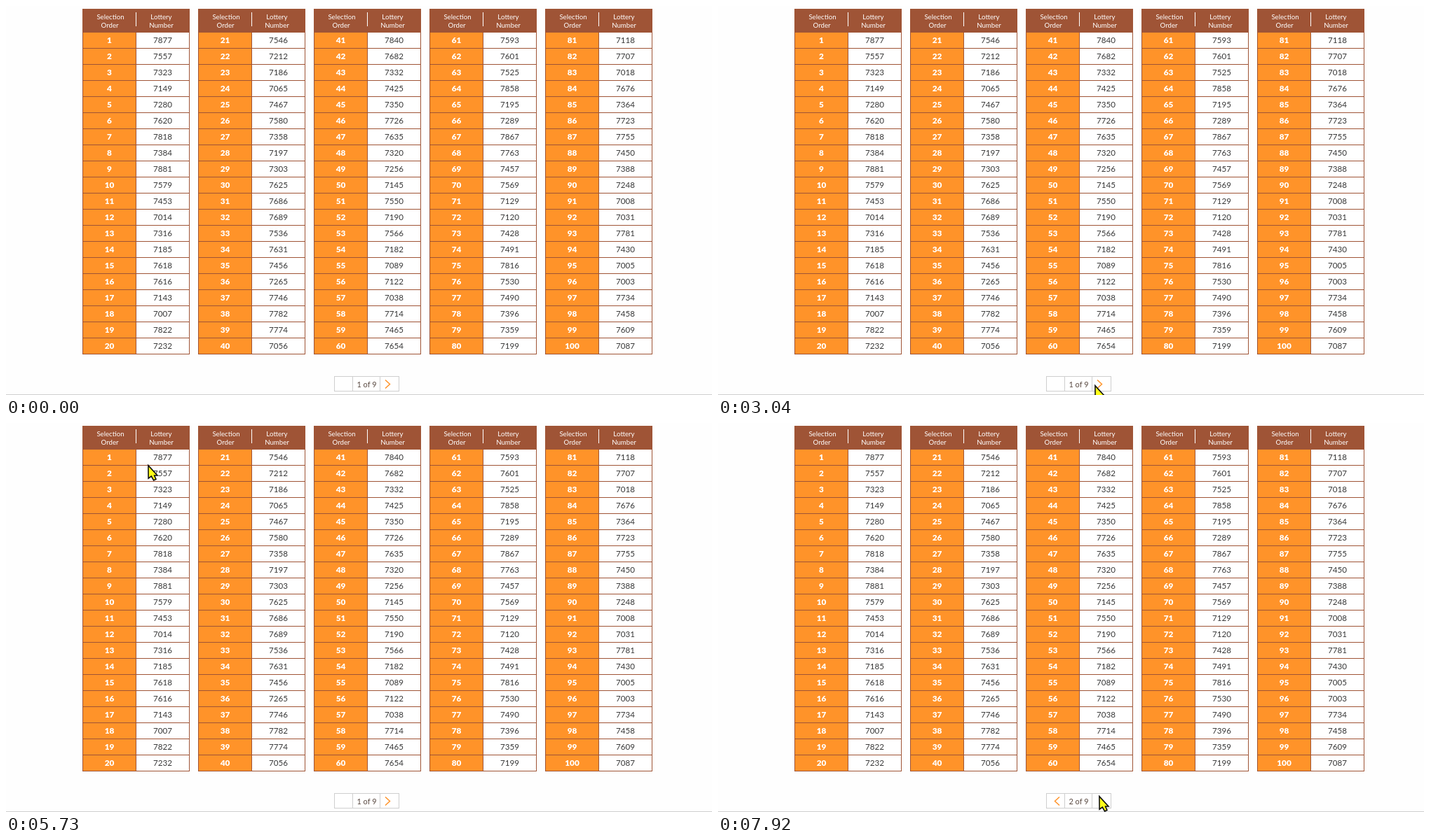
Animation of 1007x556 px, one loop 8000 ms. Source, as an HTML page:

```html
<!DOCTYPE html>
<html lang="en">
<head>
<meta charset="utf-8">
<title>Lottery numbers</title>
<style>
  html, body { margin: 0; width: 100%; height: 100%; overflow: hidden; background: #fefefe; }
  svg { display: block; width: 1007px; height: 556px; }
  text { font-family: Lato, "Open Sans", sans-serif; text-anchor: middle; }
  .head { font-size: 9.7px; fill: #fff; }
  .order { font-size: 11.8px; font-weight: 900; fill: #fff; }
  .number { font-size: 11.6px; fill: #383838; }
  .page { font-size: 11px; fill: #5a4a42; }
  .chevron { fill: none; stroke: #ff9329; stroke-width: 1.5; }
</style>
</head>
<body>
<svg id="stage" viewBox="0 0 1007 556" xmlns="http://www.w3.org/2000/svg"></svg>
<script>
const NS = "http://www.w3.org/2000/svg";
const stage = document.getElementById("stage");
const LOOP = 8000, STEP = 78, CLICK = 7750, TURN = 7920;
const BROWN = "#9f5436", ORANGE = "#ff9329", GREY = "#cfcfcf";

// Text of the lottery columns
const columns = [
  "7877 7557 7323 7149 7280 7620 7818 7384 7881 7579 7453 7014 7316 7185 7618 7616 7143 7007 7822 7232",
  "7546 7212 7186 7065 7467 7580 7358 7197 7303 7625 7686 7689 7536 7631 7456 7265 7746 7782 7774 7056",
  "7840 7682 7332 7425 7350 7726 7635 7320 7256 7145 7550 7190 7566 7182 7089 7122 7038 7714 7465 7654",
  "7593 7601 7525 7858 7195 7289 7867 7763 7457 7569 7129 7120 7428 7491 7816 7530 7490 7396 7359 7199",
  "7118 7707 7018 7676 7364 7723 7755 7450 7388 7248 7008 7031 7781 7430 7005 7003 7734 7458 7609 7087"
].map(line => line.split(" "));

function add(tag, attrs, content = "") {
  const node = document.createElementNS(NS, tag);
  for (const key in attrs) node.setAttribute(key, attrs[key]);
  node.textContent = content;
  return stage.appendChild(node);
}
const rect = (x, y, width, height, fill) => add("rect", { x, y, width, height, fill });
const label = (x, y, kind, content) => add("text", { x, y, class: kind }, content);
const chevron = d => add("path", { d, class: "chevron" });
const show = (node, visible) => node.setAttribute("visibility", visible ? "visible" : "hidden");

function drawTable(left, numbers, first) {
  rect(left, 4, 153, 494, BROWN);
  rect(left + 76, 9, 1, 20, "#fff");
  label(left + 40, 18.5, "head", "Selection");
  label(left + 39, 30.5, "head", "Order");
  label(left + 112.5, 18.5, "head", "Lottery");
  label(left + 112.5, 30.5, "head", "Number");
  numbers.forEach((number, i) => {
    const top = 38 + 23 * i;
    rect(left + 1, top, 75, 22, ORANGE);
    rect(left + 77, top, 75, 22, "#fff");
    label(left + 38.5, top + 15, "order", first + i);
    label(left + 114.5, top + 14.7, "number", number);
  });
}
columns.forEach((numbers, i) => drawTable(109 + 165 * i, numbers, 1 + 20 * i));

// Pager
rect(0, 555, 1007, 1, GREY);
add("rect", { x: 468.5, y: 529.5, width: 92, height: 21, fill: "#fff", stroke: GREY });
rect(494, 530, 1, 21, GREY);
rect(533, 530, 1, 21, GREY);
const pageText = label(514.5, 545, "page");
const previous = chevron("M487 534.5 480.5 540.5 487 546.5");
const next = chevron("M541 534.5 547.5 540.5 541 546.5");

const ring = add("circle", { cx: 543, cy: 532, fill: "none", stroke: "#f04030", "stroke-width": 1.2 });
const cursor = add("path", {
  d: "M.9 1.6 1.1 20.2 5.3 17 8.6 23 12 21.3 9.6 16H14Z",
  fill: "#ffff18", stroke: "#111", "stroke-width": 1.6
});

// Hand movements: each bends from the last resting point past `via` to `to`
const move = (start, end, via, to) => ({ start, end, via, to });
const moves = [
  move(540, 650, [895, 545], [984, 540]),
  move(1240, 1620, [840, 535], [774, 526]),
  move(1860, 2660, [556, 518], [569, 538]),
  move(2730, 2730, [567, 539], [566, 540]),
  move(3040, 3040, [550, 541], [537, 541]),
  move(3120, 3840, [-28, 600], [252, 105]),
  move(3910, 4250, [244, 93], [251, 70]),
  move(4540, 5320, [151, 52], [236, 56]),
  move(5410, 5730, [215, 54], [202, 59]),
  move(5890, 6120, [230, 60], [280, 74]),
  move(6370, 7130, [403, 320], [527, 502]),
  move(7210, 7600, [530, 522], [543, 532])
];
moves.forEach((m, i) => {
  m.from = i ? moves[i - 1].to : [900, 556];
  m.steps = Math.round((m.end - m.start) / STEP) + 1;
});

// Eased curve, held still between steps
function tipAt(t) {
  const { start, end, steps, from, via, to } = moves.filter(m => m.start <= t).pop();
  if (t >= end) return to;
  const step = Math.floor((t - start) / (end - start) * (steps - 1) + 0.25) + 1;
  const rest = (1 - step / steps) ** 2, done = 1 - rest;
  return from.map((p, i) => Math.round(rest * rest * p + 2 * rest * done * via[i] + done * done * to[i]));
}

function draw(t) {
  const visible = t >= moves[0].start, turned = t >= TURN;
  show(cursor, visible);
  if (visible) cursor.setAttribute("transform", `translate(${tipAt(t)})`);
  show(ring, t >= CLICK && !turned);
  ring.setAttribute("r", t < CLICK + 90 ? 7 : 14);
  pageText.textContent = turned ? "2 of 9" : "1 of 9";
  show(previous, turned);
  show(next, !turned);
}

const began = performance.now();
function tick() {
  draw((performance.now() - began) % LOOP);
  requestAnimationFrame(tick);
}
tick();
</script>
</body>
</html>
```
